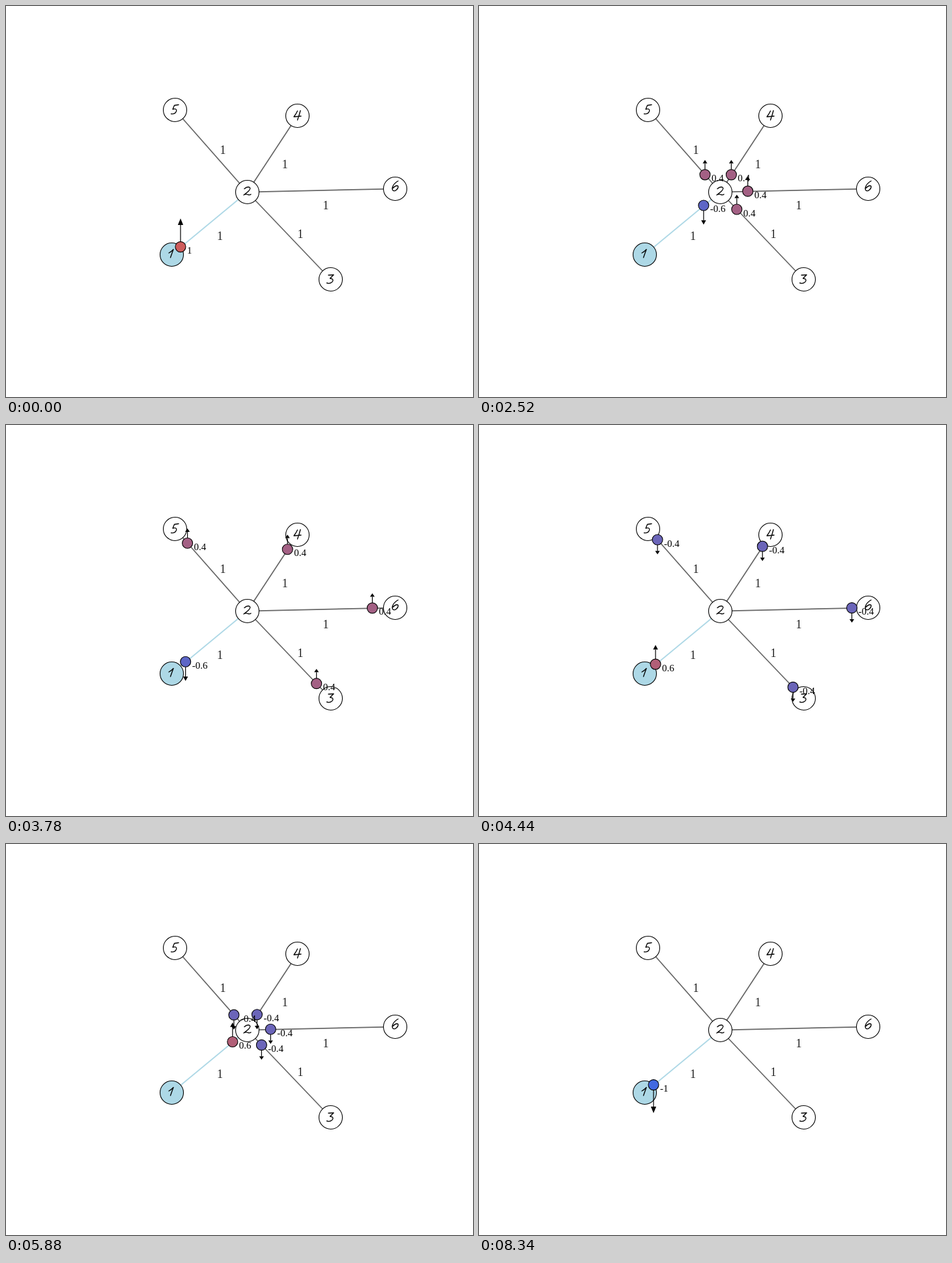
An HTML page that plays this animation: 717x600 px, repeating every 8.46 s.

```html
<!DOCTYPE html>
<html lang="en">
<head>
<meta charset="utf-8">
<title>Pulses on a star graph</title>
<style>
  html, body { margin: 0; width: 100%; height: 100%; overflow: hidden; background: #fff; }
  svg { display: block; width: 717px; height: 600px; }
  text { font-family: "Liberation Serif", "Times New Roman", serif; font-size: 15px; }
  .weight { font-size: 18px; text-anchor: middle; fill: #222; }
  .edge { stroke: #666; stroke-width: 1.7; }
  .edge.first { stroke: #add8e6; }
  .node { fill: #fff; stroke: #000; stroke-width: 1.1; }
  .node.first { fill: #add8e6; }
  .digit { fill: none; stroke: #000; stroke-width: 1.35; stroke-linecap: round; stroke-linejoin: round; }
  .ball { stroke: #000; stroke-width: 1.1; }
  .stem { stroke: #000; stroke-width: 1.2; }

  .pulse {
    animation: travel 2115ms infinite, turn 8460ms step-end infinite;
    animation-delay: 0ms, var(--delay);
  }
  /* constant acceleration, cruise, constant braking, short rest */
  @keyframes travel {
    0% { transform: translate(0, 0); animation-timing-function: cubic-bezier(.33333, 0, .66667, .33333); }
    18.913% { transform: translate(calc(var(--dx) * .125), calc(var(--dy) * .125)); animation-timing-function: linear; }
    75.65% { transform: translate(calc(var(--dx) * .875), calc(var(--dy) * .875)); animation-timing-function: cubic-bezier(.33333, .66667, .66667, 1); }
    94.563%, 100% { transform: translate(var(--dx), var(--dy)); }
  }
  /* each pulse is seen during one quarter of the loop */
  @keyframes turn {
    0% { visibility: visible; }
    25%, 100% { visibility: hidden; }
  }
</style>
</head>
<body>
<svg id="stage" viewBox="0 0 717 600"></svg>
<script>
const LOOP = 8460, LEG = LOOP / 4, R = 18;
const stage = document.getElementById('stage');

// Handwritten numerals are pen strokes relative to the node centre.
const nodes = {
  1: { x: 254.5, y: 381.5, pen: 'M-4.5 -2.5Q-1 -4 2.5 -8Q0 -1 -2 4.5' },
  2: { x: 370.5, y: 285.5, pen: 'M-4.5 -5Q-1 -8.5 3 -7.5Q6 -6 2 -1.5Q-2 2 -5.5 4.5Q-2 2.5 1 4Q4 5 5.5 3.5' },
  3: { x: 498.5, y: 419.5, pen: 'M-3.5 -6.5L4.5 -7L-1 -1.5Q5 -1 3 3Q0 7.5 -6 5.5' },
  4: { x: 447.5, y: 168.5, pen: 'M0 -7.5Q-2 -3 -5.5 1.5L5.5 .5M4.5 -8Q3 -2 0 6.5' },
  5: { x: 259.5, y: 159.5, pen: 'M5.5 -8L-1 -7L-3.5 -1Q3 -3 2 2Q0 7 -6 6' },
  6: { x: 597.5, y: 280.5, pen: 'M4.5 -12Q-3 -8 -4.5 -1Q-4.5 4 0 3Q5 0 4.5 -4Q2 -6.5 -3.5 -1' }
};
// Outer node of each edge to the hub, with the place of its weight
const edges = [[1, 328.5, 359], [3, 452, 356], [4, 428.3, 249], [5, 333, 226.5], [6, 491, 312]];

function add(parent, tag, attrs, text) {
  const el = document.createElementNS('http://www.w3.org/2000/svg', tag);
  for (const key in attrs) el.setAttribute(key, attrs[key]);
  if (text !== undefined) el.textContent = text;
  return parent.appendChild(el);
}

// Point on the rim of node a, facing node b
function rim(a, b) {
  const k = R / Math.hypot(b.x - a.x, b.y - a.y);
  return { x: a.x + (b.x - a.x) * k, y: a.y + (b.y - a.y) * k };
}

// Royal blue at -1, indian red at +1
function tint(amp) {
  const k = (amp + 1) / 2;
  const mix = (a, b) => Math.round(a + (b - a) * k);
  return `rgb(${mix(65, 205)},${mix(105, 92)},${mix(225, 92)})`;
}

function addPulse(from, to, amp, leg) {
  const a = nodes[from], b = nodes[to];
  const p = rim(a, b), q = rim(b, a);
  const size = Math.abs(amp), dir = -Math.sign(amp);
  const tip = dir * (8.5 + 35 * size);
  const base = tip - dir * (2 + 8 * size);
  const half = 3.2 + .9 * size;

  const place = add(stage, 'g', { transform: `translate(${p.x - .4} ${p.y - .4})` });
  const g = add(place, 'g', { class: 'pulse' });
  g.style.setProperty('--dx', q.x - p.x + 'px');
  g.style.setProperty('--dy', q.y - p.y + 'px');
  g.style.setProperty('--delay', (leg ? leg * LEG - LOOP : 0) + 'ms');
  add(g, 'line', { class: 'stem', y1: dir * 8, y2: base });
  add(g, 'path', { d: `M0 ${tip}L${half} ${base}H${-half}Z` });
  add(g, 'circle', { class: 'ball', r: 8, fill: tint(amp) });
  add(g, 'text', { x: 10, y: 10.5 }, amp);
}

for (const [id, x, y] of edges) {
  const p = rim(nodes[2], nodes[id]), q = rim(nodes[id], nodes[2]);
  add(stage, 'line', { class: id === 1 ? 'edge first' : 'edge', x1: p.x, y1: p.y, x2: q.x, y2: q.y });
  add(stage, 'text', { class: 'weight', x, y }, 1);
}

for (const id in nodes) {
  const { x, y, pen } = nodes[id];
  const g = add(stage, 'g', { transform: `translate(${x} ${y})`, role: 'img', 'aria-label': id });
  add(g, 'circle', { class: id === '1' ? 'node first' : 'node', r: R });
  add(g, 'path', { class: 'digit', d: pen });
}

addPulse(1, 2, 1, 0);
addPulse(2, 1, -.6, 1);
addPulse(1, 2, .6, 2);
addPulse(2, 1, -1, 3);
for (const id of [3, 4, 5, 6]) {
  addPulse(2, id, .4, 1);
  addPulse(id, 2, -.4, 2);
}
</script>
</body>
</html>
```
